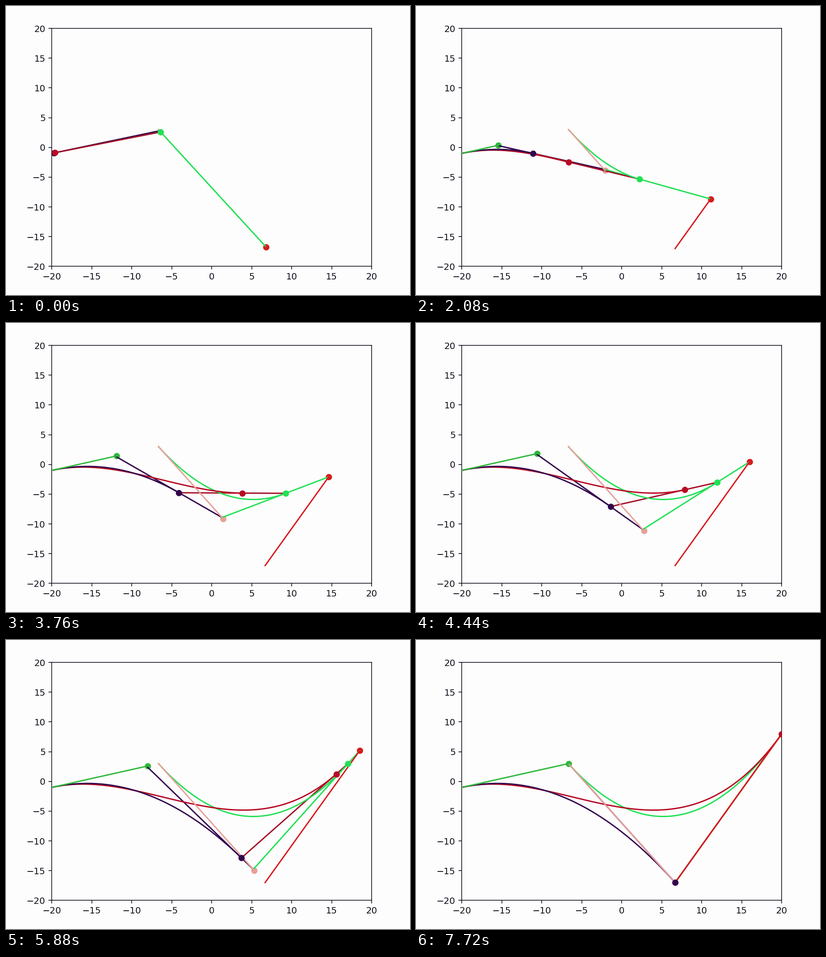
A matplotlib script that plays this animation: 884x633 px, repeating every 7760 ms.

```python
import numpy as np
import matplotlib.pyplot as plt
from matplotlib.animation import FuncAnimation

W, H, DPI = 884, 633, 128
PT = 141 / DPI          # point scale of the drawing
FRAMES, STEPS = 194, 99

INK, PAPER = "#10101c", "#fdfdfd"
GREEN, PINK, RED = "#2fb83c", "#e8a098", "#d8181c"
PURPLE, LIME, CRIMSON = "#33044d", "#22e055", "#b80a24"

P = np.array([[-20, -1], [-20 / 3, 3], [20 / 3, -17], [20, 8]])
T = np.linspace(0, 1, STEPS + 1)[:, None]


def blend(p, q):
    return (1 - T) * p + T * q


# De Casteljau levels, one row per step
a, b, c = (blend(P[i], P[i + 1]) for i in range(3))
d, e = blend(a, b), blend(b, c)
f = blend(d, e)

plt.rcParams.update({
    "font.family": "DejaVu Sans", "font.size": 10 * PT,
    "axes.linewidth": 0.8 * PT, "axes.edgecolor": INK,
    "xtick.color": INK, "ytick.color": INK,
})
fig = plt.figure(figsize=(W / DPI, H / DPI), dpi=DPI, facecolor=PAPER)
ax = fig.add_axes([100.3 / W, (H - 570.4) / H, 700 / W, 521.2 / H], facecolor=PAPER)
ax.set(xlim=(-20, 20), ylim=(-20, 20))
ticks = range(-20, 21, 5)
ax.set_xticks(ticks)
ax.set_yticks(ticks)
ax.tick_params(length=3.5 * PT, width=0.8 * PT, pad=3.5 * PT)


def line(color, z):
    return ax.plot([], [], color=color, lw=1.5 * PT, zorder=z)[0]


def dot(color, z):
    return ax.plot([], [], "o", color=color, ms=6 * PT, mew=PT, zorder=z)[0]


# path, colour, lead in steps, dot layer, trail layer
points = [
    (path, lead, dot(color, zd), line(color, zt))
    for path, color, lead, zd, zt in [
        (b, PINK, 0.8, 2.0, 3.4),
        (a, GREEN, 0.8, 2.1, 3.5),
        (c, RED, 0.5, 2.2, 3.3),
        (e, LIME, 0, 4.0, 3.0),
        (d, PURPLE, 0, 4.1, 3.2),
        (f, CRIMSON, 0, 4.2, 3.1),
    ]
]
links = [
    (a, b, line(PURPLE, 2.5)),
    (b, c, line(LIME, 2.6)),
    (d, e, line("#a40d26", 2.7)),
]


def progress(i):
    """Steps done, slowing slightly as the trails grow."""
    return np.interp(i, [0, 27, 77, 111, 133, 161, 170],
                     [1.2, 17.6, 49.3, 69.3, 81.3, 95.3, 99.3])


def update(i):
    now = progress(i)
    for path, lead, mark, trail in points:
        k = min(int(now + lead + 1e-6), STEPS)
        mark.set_data(path[k:k + 1, 0], path[k:k + 1, 1])
        trail.set_data(path[:k + 1, 0], path[:k + 1, 1])
    k = min(int(now), STEPS)
    for p, q, link in links:
        link.set_data([p[k, 0], q[k, 0]], [p[k, 1], q[k, 1]])
    return []


anim = FuncAnimation(fig, update, frames=FRAMES, interval=40,
                     repeat=True, repeat_delay=0, blit=False)
plt.show()
```
